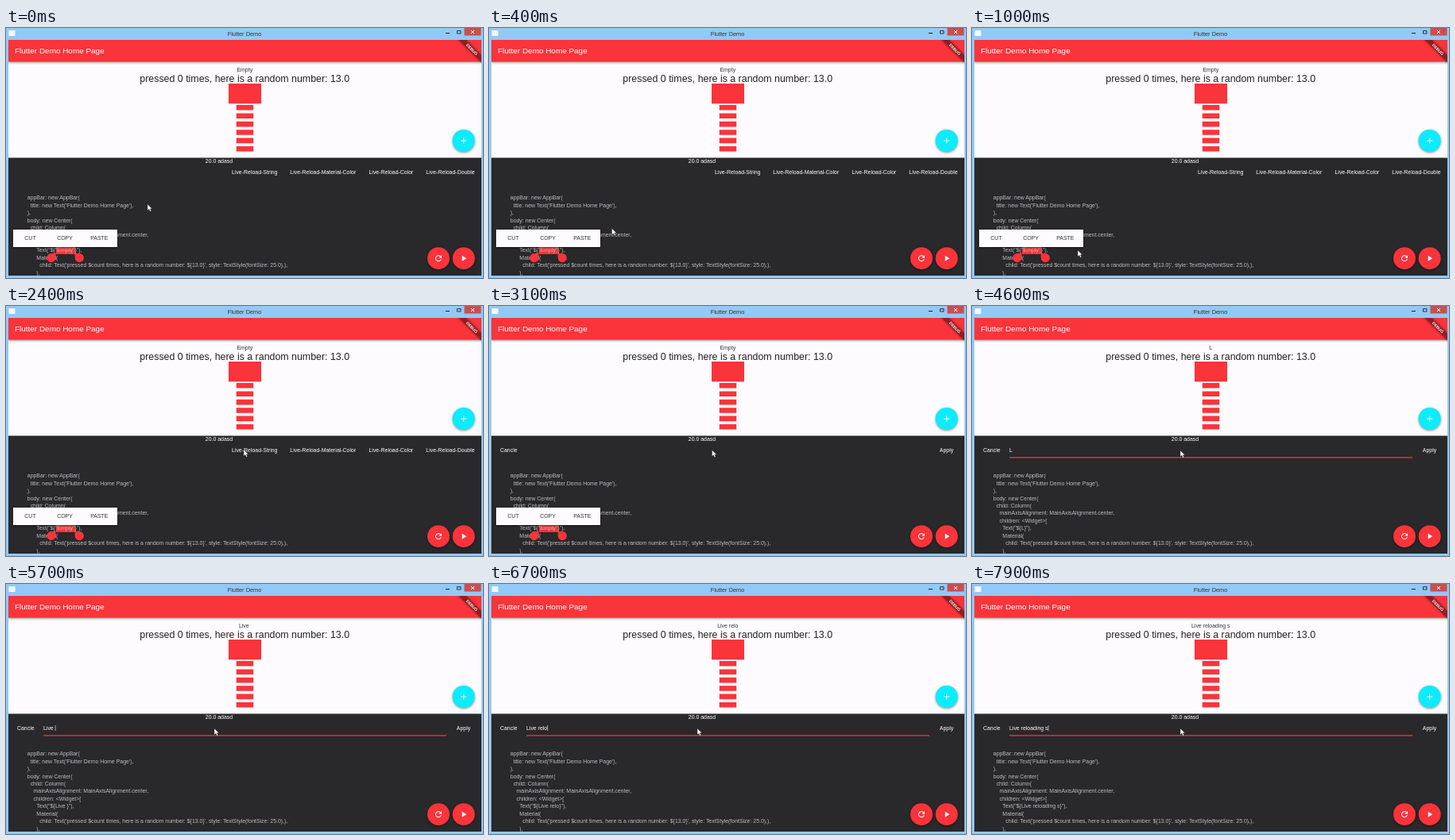
Write an HTML page that moves like this. It is 600x315 px and loops after 8000 ms.

```html
<!DOCTYPE html>
<html lang="en">
<head>
<meta charset="utf-8">
<title>Flutter Demo</title>
<style>
  html, body { margin: 0; width: 100%; height: 100%; overflow: hidden; background: #91c9f7; }
  svg { display: block; width: 600px; height: 315px; }
  text { font: 6.95px "Liberation Sans", Arial, sans-serif; white-space: pre; }
  .mid { text-anchor: middle; }
  .red { fill: #f9343a; }
  .raised { filter: drop-shadow(0 1px 1.5px rgba(0, 0, 0, .45)); }
</style>
</head>
<body>
<svg viewBox="0 0 600 315">
  <defs>
    <clipPath id="window"><rect x="3" y="15" width="595" height="297"/></clipPath>
  </defs>

  <rect width="600" height="315" fill="#91c9f7"/>
  <rect x="3.5" y="3" width="8" height="7" fill="#f4f8fb"/>
  <text class="mid" x="300" y="10" fill="#333" style="font-size:7.4px">Flutter Demo</text>
  <rect x="576.5" width="21" height="9.5" fill="#c75050"/>
  <g fill="none" stroke="#222">
    <path d="M553 6.5h5"/>
    <path d="M567.5 3.5h4.5v3.5h-4.5z" stroke-width=".9"/>
    <path d="M585 3l4 4m0-4l-4 4" stroke="#fff"/>
  </g>

  <g clip-path="url(#window)">
    <rect x="3" y="15" width="595" height="149" fill="#fdfbfe"/>
    <rect class="red raised" x="3" y="15" width="595" height="27.5"/>
    <text x="11" y="32.3" fill="#fff" style="font-size:9.95px">Flutter Demo Home Page</text>
    <g transform="translate(598 15) rotate(45)">
      <rect x="-22" y="13.9" width="44" height="6" fill="#8f1f25" style="filter:drop-shadow(0 0 1.5px rgba(0,0,0,.6))"/>
      <text class="mid" y="18.7" fill="#fff" style="font-size:5px;font-weight:bold">DEBUG</text>
    </g>

    <text id="label" class="mid" x="300.3" y="55" fill="#333"></text>
    <text class="mid" x="300.2" y="68" fill="#222" style="font-size:12.4px">pressed 0 times, here is a random number: 13.0</text>
    <rect class="red" x="280" y="70" width="41" height="25.3"/>
    <path d="M300.5 97v59" stroke="#f9343a" stroke-width="21.5" stroke-dasharray="6.6 3.8"/>

    <rect x="3" y="163.5" width="595" height="149" fill="#29282b"/>
    <text x="250.8" y="170.2" fill="#fff">20.0 adasd</text>

    <g id="buttons" fill="#fff">
      <text x="284" y="183.9">Live-Reload-String</text>
      <text x="357.3" y="183.9">Live-Reload-Material-Color</text>
      <text x="456.5" y="183.9">Live-Reload-Color</text>
      <text x="528.3" y="183.9">Live-Reload-Double</text>
    </g>
    <g id="editor" fill="#fff">
      <text x="14" y="183.9">Cancle</text>
      <text x="566.8" y="183.9">Apply</text>
      <text id="field" x="47" y="183.9"></text>
    </g>
    <rect id="underline" class="red" x="47" y="190.3" width="507" height="1.3"/>
    <rect id="caret" y="178" width=".9" height="7" fill="#a9b4c2"/>

    <rect id="highlight" class="red" x="62.7" y="276" width="24.8" height="9"/>
    <g id="code" fill="#bdbdc0"></g>
    <g id="selection">
      <g class="red">
        <path d="M62.5 284v5.5a5.6 5.6 0 1 1-5.6-5.5z"/>
        <path d="M86.7 284v5.5a5.6 5.6 0 1 0 5.6-5.5z"/>
      </g>
      <rect class="raised" x="9" y="254" width="131" height="22" fill="#fdfbfe"/>
      <g class="mid" fill="#333">
        <text x="30.5" y="267.4">CUT</text>
        <text x="74" y="267.4">COPY</text>
        <text x="117.3" y="267.4">PASTE</text>
      </g>
    </g>

    <g class="raised">
      <circle cx="575.7" cy="142" r="14" fill="#0cecfc"/>
      <circle class="red" cx="544" cy="290.2" r="14"/>
      <circle class="red" cx="575.7" cy="290.2" r="14"/>
    </g>
    <g fill="#fff">
      <path transform="translate(569.7 136) scale(.5)" d="M19 13h-6v6h-2v-6H5v-2h6V5h2v6h6z"/>
      <path transform="translate(538 284.2) scale(.5)" d="M17.65 6.35A8 8 0 1 0 19.73 14H17.65A6 6 0 1 1 16.22 7.78L13 11h7V4z"/>
      <path transform="translate(569.7 284.2) scale(.5)" d="M8 5v14l11-7z"/>
    </g>
  </g>

  <circle id="ripple" cx="262" cy="182" fill="#fff"/>
  <path id="pointer" d="M0 0v8l1.9-1.7 1.4 3 1.4-.7-1.4-2.8h2.5z" fill="#fff" stroke="#222" stroke-width=".4"/>
</svg>

<script>
const LOOP = 8000, STEP = 100, OPEN = 2500, FOCUS = 3700, BLINK = 500;
const PHRASE = "Live reloading s";
// When each character of PHRASE is typed
const KEYS = [4600, 5000, 5100, 5400, 5600, 5900, 6100, 6500, 6700,
              6900, 7000, 7200, 7300, 7500, 7700, 7900];
// Pointer path: time, x, y
const PATH = [[0, 178, 222], [800, 131, 283], [900, 131, 283], [1000, 133, 280], [1700, 296, 184],
              [1900, 296, 184], [2100, 299, 181], [2900, 299, 181], [3300, 262, 182], [LOOP, 262, 182]];

const codeFor = value => `appBar: new AppBar(
  title: new Text('Flutter Demo Home Page'),
),
body: new Center(
  child: Column(
    mainAxisAlignment: MainAxisAlignment.center,
    children: <Widget>[
      Text("\${${value}}"),
      Material(
        child: Text('pressed $count times, here is a random number: \${13.0}', style: TextStyle(fontSize: 25.0),),
      ),`.split("\n");

const el = id => document.getElementById(id);
const show = (id, on) => { el(id).style.display = on ? "" : "none"; };
const set = (id, attrs) => { for (const k in attrs) el(id).setAttribute(k, attrs[k]); };

const lines = codeFor("").map((_, i) => {
  const line = document.createElementNS("http://www.w3.org/2000/svg", "text");
  line.setAttribute("x", 26.8);
  line.setAttribute("y", 216.3 + 9.42 * i);
  return el("code").appendChild(line);
});

function pointerAt(t) {
  const i = PATH.findIndex(p => p[0] > t);
  const [t0, x0, y0] = PATH[i - 1], [t1, x1, y1] = PATH[i];
  const p = (t - t0) / (t1 - t0), e = p * p * (3 - 2 * p);
  return [x0 + (x1 - x0) * e, y0 + (y1 - y0) * e];
}

function draw(t) {
  const focused = t >= FOCUS;
  const typed = PHRASE.slice(0, KEYS.filter(k => k <= t).length);

  show("buttons", t < OPEN);
  show("editor", t >= OPEN);
  show("underline", focused);
  show("highlight", !focused);
  show("selection", !focused);

  el("label").textContent = focused ? typed : "Empty";
  el("field").textContent = typed;
  codeFor(focused ? typed : '"Empty"').forEach((s, i) => { lines[i].textContent = s; });

  show("caret", focused && Math.floor((t - FOCUS) / BLINK) % 2 === 0);
  set("caret", { x: 47 + (typed && el("field").getComputedTextLength()) });

  const fade = (t - FOCUS) / 400;
  show("ripple", fade >= 0 && fade < 1);
  set("ripple", { r: 8 + 4 * Math.max(0, fade), opacity: .3 * (1 - fade) });
  set("pointer", { transform: `translate(${pointerAt(t)})` });
}

function tick() {
  draw(Math.floor(performance.now() % LOOP / STEP) * STEP);
  requestAnimationFrame(tick);
}
tick();
</script>
</body>
</html>
```
